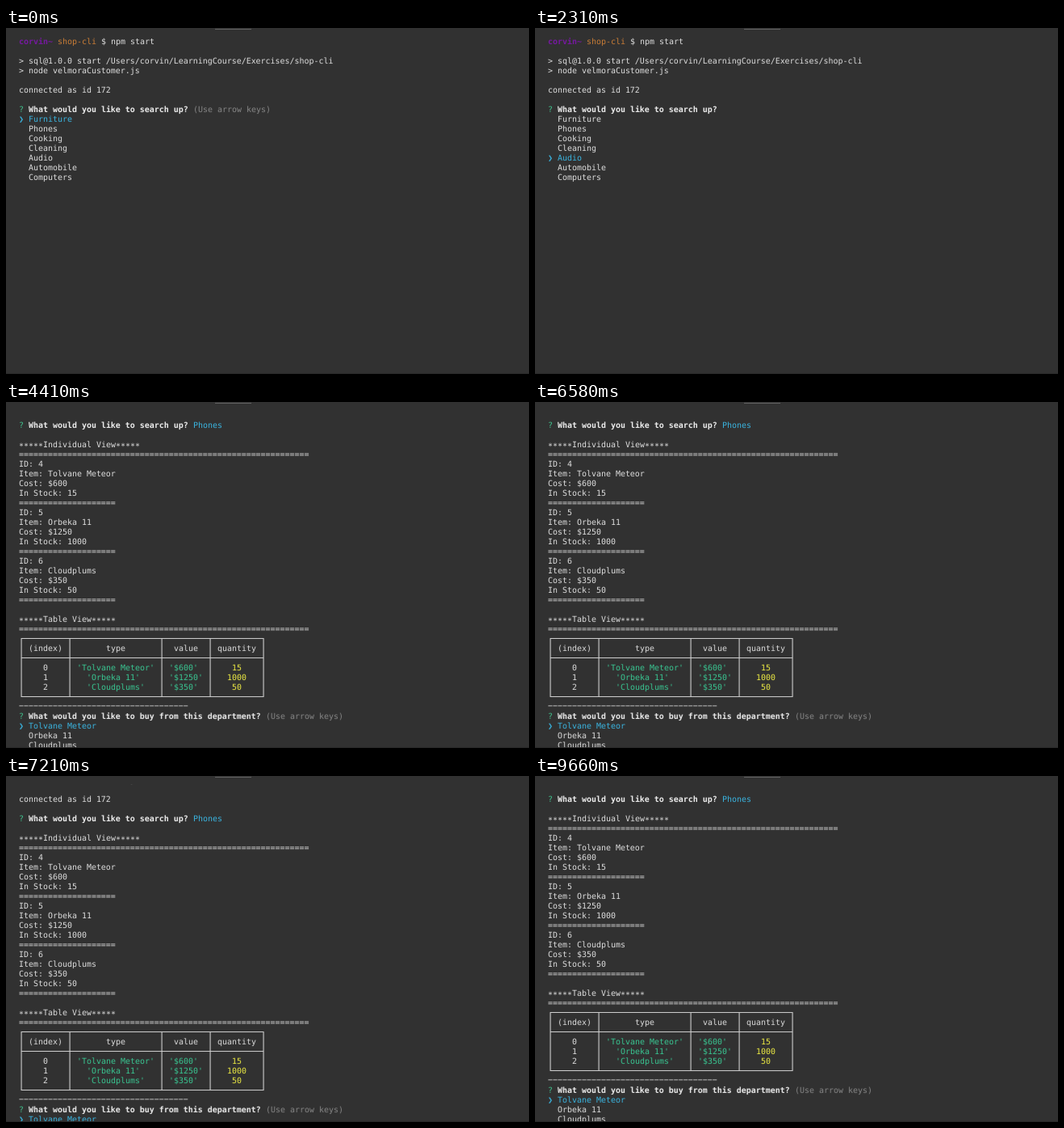
Write an HTML page that moves like this. It is 648 by 428 pixels and loops after 9.73 s.

```html
<!DOCTYPE html>
<html lang="en">
<head>
<meta charset="utf-8">
<title>Terminal shop</title>
<style>
  html, body { margin: 0; width: 100%; height: 100%; overflow: hidden; background: #313131; }
  svg { display: block; width: 648px; height: 428px; }
  text {
    font: 9.966px "DejaVu Sans Mono", "Liberation Mono", monospace;
    fill: #dedede;
    text-rendering: geometricPrecision;
    white-space: pre;
  }
  .bold { font-weight: bold; fill: #ececec; }
  .user { font-weight: bold; fill: #75189f; }
  .dir { fill: #c97c35; }
  .ask { fill: #3fc08c; }
  .blue { fill: #39b4e0; }
  .green { fill: #38c792; }
  .yellow { fill: #efed42; }
  .hint { fill: #868686; }
  .frame { fill: none; stroke: #cfcfcf; stroke-width: 1.1; }

  #menu, #result, #scroll, .first { animation: 9.73s step-end infinite; }
  #menu { --k: 0; animation-name: pick; }
  #result { visibility: hidden; animation-name: show; }
  #scroll { animation-name: scroll; }
  .first { animation-name: first; }

  /* --k is the selected row, --i the row of an item */
  .item { --off: max(var(--k) - var(--i), var(--i) - var(--k)); }
  .on { opacity: calc(1 - var(--off)); }
  .plain { opacity: calc(var(--off)); }
  #cursor { transform: translateY(calc(var(--k) * 12px)); }

  @keyframes pick {
    0% { --k: 0; visibility: visible; }
    17.2% { --k: 1; visibility: visible; }
    18.7% { --k: 2; visibility: visible; }
    20.1% { --k: 3; visibility: visible; }
    22.3% { --k: 4; visibility: visible; }
    25.1% { --k: 5; visibility: visible; }
    27.3% { --k: 4; visibility: visible; }
    28.8% { --k: 3; visibility: visible; }
    30.2% { --k: 2; visibility: visible; }
    32.3% { --k: 1; visibility: visible; }
    38.1%, 100% { --k: 1; visibility: hidden; }
  }
  @keyframes first {
    0% { opacity: 1; }
    17.2%, 100% { opacity: 0; }
  }
  @keyframes show {
    0% { visibility: hidden; }
    38.1%, 100% { visibility: visible; }
  }
  @keyframes scroll {
    0% { transform: translateY(0); }
    38.1% { transform: translateY(-72px); }
    70.5% { transform: translateY(-60px); }
    71.9% { transform: translateY(-48px); }
    76.9% { transform: translateY(-60px); }
    77.6%, 100% { transform: translateY(-72px); }
  }
</style>
</head>
<body>
<svg viewBox="0 0 648 428">
  <rect width="648" height="428" fill="#313131"/>
  <!-- the tiny turn keeps baselines from snapping to whole pixels -->
  <g transform="rotate(.01)">
    <g id="scroll">
      <g id="head"></g>
      <g id="menu"><g id="cursor"></g></g>
      <g id="result"></g>
    </g>
  </g>
  <rect width="648" height="10" fill="#313131"/>
  <rect x="259" y="1" width="45" height="1" fill="#626262"/>
  <rect y="427" width="648" height="1" fill="#282828"/>
</svg>
<script>
  const NS = "http://www.w3.org/2000/svg";
  const [head, menu, cursor, result] =
    ["head", "menu", "cursor", "result"].map(id => document.getElementById(id));

  function add(parent, tag, attrs) {
    const el = document.createElementNS(NS, tag);
    for (const key in attrs) el.setAttribute(key, attrs[key]);
    return parent.appendChild(el);
  }

  // Writes text on the 6 by 12 pixel character grid
  function put(parent, row, col, str, cls = "", drop = 0) {
    const el = add(parent, "text", { x: 16 + col * 6, y: 19.5 + row * 12 + drop, class: cls });
    el.textContent = str;
    return el;
  }

  function question(parent, row, str) {
    put(parent, row, 0, "?", "ask");
    put(parent, row, 2, str, "bold");
  }

  function title(row, name) {
    put(result, row, 0, "*****", "", 2);
    put(result, row, 5, name);
    put(result, row, 5 + name.length, "*****", "", 2);
    put(result, row + 1, 0, "=".repeat(60));
  }

  // Command and first question
  put(head, 0, 0, "corvin~", "user");
  put(head, 0, 8, "shop-cli", "dir");
  put(head, 0, 17, "$ npm start");
  put(head, 2, 0, "> sql@1.0.0 start /Users/corvin/LearningCourse/Exercises/shop-cli");
  put(head, 3, 0, "> node velmoraCustomer.js");
  put(head, 5, 0, "connected as id 172");
  question(head, 7, "What would you like to search up?");

  // Department menu
  const hint = "(Use arrow keys)";
  put(menu, 7, 36, hint, "hint first");
  put(cursor, 8, 0, "❯", "blue");
  ["Furniture", "Phones", "Cooking", "Cleaning", "Audio", "Automobile", "Computers"]
    .forEach((name, i) => {
      for (const cls of ["item plain", "item on blue"])
        put(menu, 8 + i, 2, name, cls).style.setProperty("--i", i);
    });

  // Listing of the chosen department
  const goods = [
    ["Tolvane Meteor", "$600", "15"],
    ["Orbeka 11", "$1250", "1000"],
    ["Cloudplums", "$350", "50"]
  ];
  put(result, 7, 36, "Phones", "blue");
  title(9, "Individual View");
  goods.forEach(([name, cost, stock], i) => {
    const lines = ["ID: " + (4 + i), "Item: " + name, "Cost: " + cost,
      "In Stock: " + stock, "=".repeat(20)];
    lines.forEach((line, j) => put(result, 11 + i * 5 + j, 0, line));
  });

  // Table with centred cells
  title(27, "Table View");
  const edges = [0, 10, 29, 39, 50];
  function cells(row, values, classes = []) {
    values.forEach((str, i) => {
      const room = edges[i + 1] - edges[i] - 1;
      const pad = Math.floor((room - str.length) / 2);
      put(result, row, edges[i] + 1 + pad, str, classes[i]);
    });
  }
  cells(30, ["(index)", "type", "value", "quantity"]);
  goods.forEach(([name, cost, stock], i) =>
    cells(32 + i, [String(i), `'${name}'`, `'${cost}'`, stock], ["", "green", "green", "yellow"]));
  const lineY = row => 16.5 + row * 12;
  const bars = edges.map(c => `M${19.1 + c * 6} ${lineY(29)}V${lineY(35)}`);
  const rules = [29, 31, 35].map(r => `M18.6 ${lineY(r)}H319.6`);
  add(result, "path", { class: "frame", d: bars.concat(rules).join("") });

  // Second question
  put(result, 36, 0, "−".repeat(35), "", -0.4);
  question(result, 37, "What would you like to buy from this department?");
  put(result, 37, 51, hint, "hint");
  put(result, 38, 0, "❯", "blue");
  goods.forEach(([name], i) => put(result, 38 + i, 2, name, i ? "" : "blue"));
</script>
</body>
</html>
```
